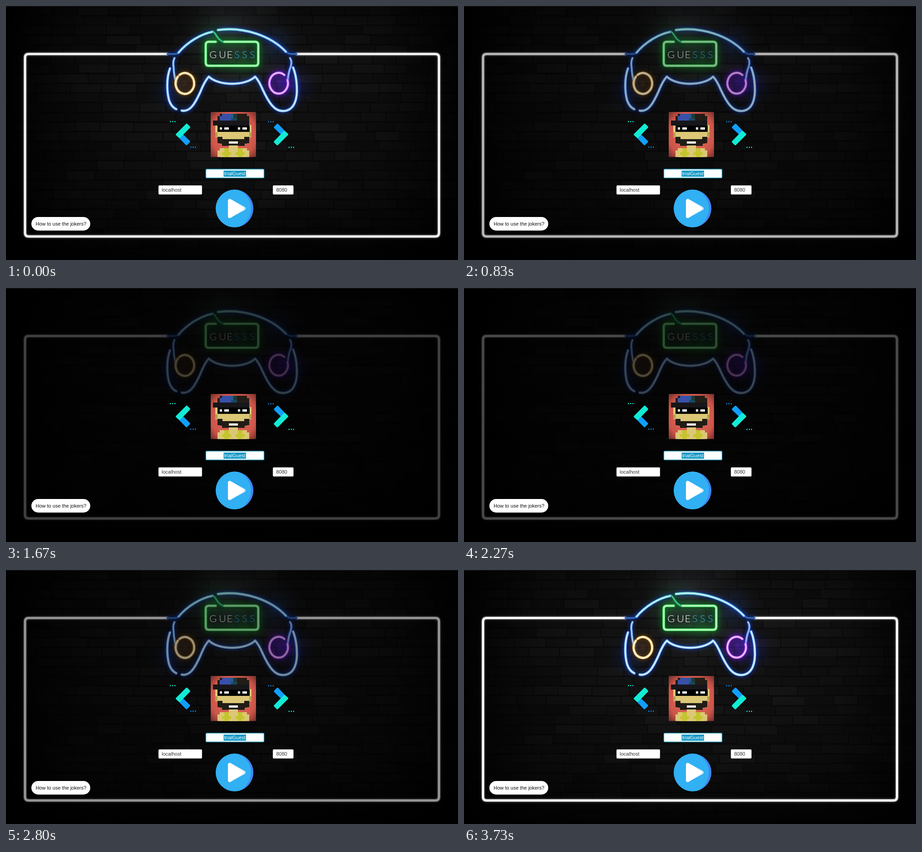
An HTML page with a canvas that plays this animation: 998 px wide and 561 px high, repeating every 3.76 s.

```html
<!DOCTYPE html>
<html lang="en">
<head>
<meta charset="utf-8">
<title>Quiz lobby</title>
<style>
html, body { margin: 0; width: 100%; height: 100%; overflow: hidden; background: #000; }
canvas { display: block; }
</style>
</head>
<body>
<canvas id="stage" width="998" height="561"></canvas>
<script>
const W = 998, H = 561, LOOP = 3760;
const ctx = document.getElementById('stage').getContext('2d');

function layer(draw) {
  const c = document.createElement('canvas');
  c.width = W;
  c.height = H;
  draw(c.getContext('2d'));
  return c;
}

function randomizer(seed) {
  return () => (seed = (seed * 16807) % 2147483647) / 2147483647;
}

function rect(g, color, x, y, w, h) {
  g.fillStyle = color;
  g.fillRect(x, y, w, h);
}

function roundRect(g, color, x, y, w, h, r) {
  g.fillStyle = color;
  g.beginPath();
  g.roundRect(x, y, w, h, r);
  g.fill();
}

function glow(g, x, y, r, color) {
  const grad = g.createRadialGradient(x, y, 0, x, y, r);
  grad.addColorStop(0, `rgba(${color})`);
  grad.addColorStop(1, 'rgba(0,0,0,0)');
  rect(g, grad, x - r, y - r, r * 2, r * 2);
}

function linear(g, x0, y0, x1, y1, ...colors) {
  const grad = g.createLinearGradient(x0, y0, x1, y1);
  colors.forEach((c, i) => grad.addColorStop(i / (colors.length - 1), c));
  return grad;
}

function text(g, str, x, y, color, font, align = 'left') {
  g.font = font;
  g.fillStyle = color;
  g.textAlign = align;
  g.fillText(str, x, y);
}

// ---- Fading backdrop: brick wall and neon sign ----

function drawWall(g) {
  const rnd = randomizer(77);
  const rowH = 21.4;
  rect(g, '#0d0d0d', 0, 0, W, H);
  for (let row = 0; row < 27; row++) {
    let x = -rnd() * 60;
    while (x < W) {
      const w = 48 + rnd() * 36;
      const v = 18 + Math.floor(rnd() * 9);
      const y = row * rowH + rnd() * 2;
      roundRect(g, `rgb(${v},${v},${v})`, x, y, w - 2, rowH - 3, 2);
      x += w;
    }
  }
  rect(g, linear(g, 0, 0, W, 0, 'rgba(0,0,0,.95)', 'rgba(0,0,0,.4)', 'rgba(0,0,0,.15)',
    'rgba(0,0,0,0)', 'rgba(0,0,0,.1)', 'rgba(0,0,0,.3)', 'rgba(0,0,0,.85)'), 0, 0, W, H);
  rect(g, linear(g, 0, 0, 0, H, 'rgba(0,0,0,.4)', 'rgba(0,0,0,0)', 'rgba(0,0,0,.1)',
    'rgba(0,0,0,.3)', 'rgba(0,0,0,.9)'), 0, 0, W, H);
}

function drawGlows(g) {
  g.save();
  g.globalCompositeOperation = 'lighter';
  glow(g, 499, 60, 170, '22,24,27,1');
  glow(g, 460, 75, 75, '4,40,16,1');
  glow(g, 525, 115, 80, '4,38,12,1');
  glow(g, 395, 171, 46, '42,22,2,1');
  glow(g, 604, 168, 55, '45,8,105,1');
  glow(g, 365, 190, 60, '2,12,48,1');
  glow(g, 635, 175, 65, '8,10,62,1');
  glow(g, 595, 85, 65, '4,18,48,1');
  g.restore();
}

function neon(g, d, edge, core, halo, blur = 10, width = 5.8) {
  const path = new Path2D(d);
  g.save();
  g.lineCap = 'round';
  g.lineJoin = 'round';
  g.shadowColor = halo;
  g.shadowBlur = blur;
  g.strokeStyle = edge;
  g.lineWidth = width;
  g.stroke(path);
  g.shadowBlur = 0;
  g.strokeStyle = core;
  g.lineWidth = width * 0.6;
  g.stroke(path);
  g.restore();
}

function drawSign(g) {
  neon(g, 'M356 106H50q-8 0 -8 8V501q0 8 8 8H948q8 0 8 -8V114q0 -8 -8 -8H642',
    '#bdbdbd', '#ffffff', 'rgba(255,255,255,.35)', 5, 6);

  const halo = 'rgba(25,80,255,.75)', edge = '#5796ee', core = '#cdeeff';
  neon(g, 'M357 106H372Q379 106 383 101', '#183f82', '#3b70c0', halo, 8, 4.6);
  neon(g, 'M641 106H629Q621 105 617 99', '#183f82', '#3b70c0', halo, 8, 4.6);
  neon(g, 'M381 103C400 80 430 62 456 57', linear(g, 381, 0, 456, 0, '#4b8eec', '#3fc2cc'),
    '#b9eff6', halo);
  neon(g, 'M468 53C525 45 585 66 618 101', linear(g, 468, 0, 618, 0, '#3ecbb8', '#4ba5e4', '#4b88ec'),
    '#bdeff8', halo);
  neon(g, 'M372 115Q368 123 370 135Q371 157 376 169', edge, '#a9d6f6', halo, 8, 4.8);
  neon(g, 'M627 115Q632 121 629 133Q623 148 622 166', edge, '#a3baff', halo, 8, 4.8);
  neon(g, 'M362 138C354 160 355 189 360 208Q365 223 376 228', edge, core, halo);
  neon(g, 'M388 231C407 235 418 214 429 190Q439 165 448 156C469 177 529 177 550 156' +
    'Q558 164 567 185C581 215 593 232 611 232C638 232 644 203 642 176Q641 154 634 136',
    edge, core, halo);

  neon(g, 'M459 58C465 63 466 74 481 80', '#1b8f60', '#46c98c', 'rgba(12,138,53,.7)', 8, 4.5);
  neon(g, 'M463 79H448Q441 79 441 86V125Q441 132 448 132H550Q557 132 557 125V86Q557 79 550 79H482',
    '#3ccc5a', '#b4ffbd', 'rgba(12,190,46,.8)', 13, 6);

  neon(g, 'M383.2 152.2A20.5 23 0 1 1 379.3 156.2', '#dcb05c', '#fff5d0',
    'rgba(170,100,0,.6)', 8);
  neon(g, 'M614.6 152.4A20.5 23 0 1 0 621.5 163.4', '#a950e4', '#f0bcff',
    'rgba(112,20,255,.8)', 10);

  [...'GUESSS'].forEach((ch, i) => {
    text(g, ch, [457, 478, 494, 510, 527, 544][i], 115, i < 3 ? '#ffffff' : '#36aef0',
      '300 22px Lato, sans-serif', 'center');
  });
}

const backdrop = layer(g => {
  drawWall(g);
  drawGlows(g);
  drawSign(g);
});

// ---- Static controls ----

function drawAvatar(g) {
  g.save();
  g.beginPath();
  g.rect(452, 234, 100, 99.5);
  g.clip();
  const bg = g.createRadialGradient(502, 284, 30, 502, 284, 72);
  bg.addColorStop(0, '#dc6152');
  bg.addColorStop(0.5, '#cb5549');
  bg.addColorStop(1, '#6c2b27');
  rect(g, bg, 452, 234, 100, 100);

  const skin = '#dcc777', dark = '#211d16', strap = '#c4c52c';
  rect(g, skin, 462, 263, 80, 27);
  rect(g, skin, 467, 284, 70, 12);
  rect(g, '#b99f50', 462, 279, 5, 10);
  rect(g, '#b99f50', 537, 279, 5, 10);
  rect(g, dark, 472, 238, 60, 6);
  rect(g, dark, 467, 243, 70, 12);
  rect(g, '#17161a', 457, 253, 80, 11);
  rect(g, '#3950a9', 477, 238, 20, 5);
  rect(g, '#3950a9', 472, 243, 25, 10);
  rect(g, '#1b6282', 497, 238, 5, 10);
  rect(g, '#174a5d', 497, 248, 13, 5);
  rect(g, '#20383c', 502, 238, 8, 10);
  rect(g, '#000', 467, 264, 71, 14);
  for (const [x, w] of [[472, 5], [482, 10], [512, 5], [522, 10]]) rect(g, '#fff', x, 268, w, 5);

  rect(g, dark, 467, 289, 11, 14);
  rect(g, dark, 526, 289, 11, 14);
  rect(g, dark, 472, 294, 60, 10);
  rect(g, dark, 477, 303, 50, 6);
  rect(g, '#f1eee5', 492, 299, 20, 5);

  rect(g, skin, 492, 308, 20, 26);
  rect(g, skin, 472, 314, 60, 20);
  rect(g, skin, 467, 319, 70, 15);
  for (const x of [482, 512]) {
    rect(g, strap, x, 314, 10, 20);
    rect(g, strap, x - 5, 323, 20, 6);
  }
  g.restore();
}

function softPolygon(g, color, points, radius) {
  g.beginPath();
  points.forEach(([x, y]) => g.lineTo(x, y));
  g.closePath();
  g.fillStyle = g.strokeStyle = color;
  g.lineJoin = 'round';
  g.lineWidth = radius * 2;
  g.fill();
  g.stroke();
}

function drawArrow(g) {
  const teal = '#12ecd5', blue = '#10a0fc';
  softPolygon(g, blue, [[384.5, 291], [390, 285.5], [404.5, 299.5], [398.5, 305.5]], 2);
  softPolygon(g, teal, [[377, 284], [399, 262], [404.5, 267.5], [383, 289.5]], 2.2);
  for (let i = 0; i < 3; i++) {
    rect(g, teal, 362 + i * 5, 254, 2.2, 2.6);
    rect(g, '#168bea', 407 + i * 5, 310.5, 2.2, 2.6);
  }
}

function drawField(g, x, y, w, h) {
  roundRect(g, '#c9c3c9', x, y, w, h, 2.5);
  roundRect(g, '#fff', x + 1, y + 1, w - 2, h - 2, 2);
}

function drawPlay(g) {
  const disc = new Path2D();
  disc.arc(504.7, 447.2, 41.6, 0, 7);
  g.save();
  g.clip(disc);
  rect(g, '#4284f0', 460, 400, 90, 95);
  g.fillStyle = '#31b0f3';
  g.beginPath();
  g.ellipse(500, 447.2, 41, 43.5, 0, 0, 7);
  g.fill();
  g.restore();
  softPolygon(g, '#cdeafb', [[496, 431], [496, 463], [525, 447.2]], 4);
  softPolygon(g, '#fff', [[494, 430], [494, 464.5], [521, 447.2]], 4);
}

const controls = layer(g => {
  const font = '11px "Liberation Sans", Arial, sans-serif';
  drawAvatar(g);
  drawArrow(g);
  g.save();
  g.translate(W, 567.5);
  g.rotate(Math.PI);
  drawArrow(g);
  g.restore();

  roundRect(g, '#2397b4', 440.5, 359.5, 130, 21, 3);
  roundRect(g, '#fff', 442, 361, 127, 18, 1.5);
  rect(g, '#0b96c4', 480.5, 363.5, 49.5, 13.5);
  text(g, 'trialGuest', 505.3, 374, '#fff', font, 'center');

  drawField(g, 336.5, 396, 96.5, 20.5);
  drawField(g, 589, 396, 46, 20.5);
  text(g, 'localhost', 343.8, 410, '#333', font);
  text(g, '8080', 596.5, 410, '#333', font);

  drawPlay(g);
  roundRect(g, '#fff', 56, 466, 130, 30, 15);
  text(g, 'How to use the jokers?', 65.5, 485, '#111', font);
  rect(g, '#1d1d21', 0, 0, W, 1);
});

// ---- Pulse ----

// Constant speed with a fifth of the span spent speeding up and slowing down.
function ease(t) {
  if (t < 0.2) return 3.125 * t * t;
  if (t > 0.8) return 1 - 3.125 * (1 - t) ** 2;
  return 1.25 * t - 0.125;
}

function brightness(ms) {
  const dimmest = 1935, span = 1750;
  let t = Math.abs(ms - dimmest) / span;
  if (t > 1) t = 2 - t;
  return 0.2 + 0.8 * ease(t);
}

function frame() {
  const ms = performance.now() % LOOP;
  ctx.globalAlpha = 1;
  rect(ctx, '#000', 0, 0, W, H);
  ctx.globalAlpha = brightness(ms);
  ctx.drawImage(backdrop, 0, 0);
  ctx.globalAlpha = 1;
  ctx.drawImage(controls, 0, 0);
  requestAnimationFrame(frame);
}
frame();
</script>
</body>
</html>
```
